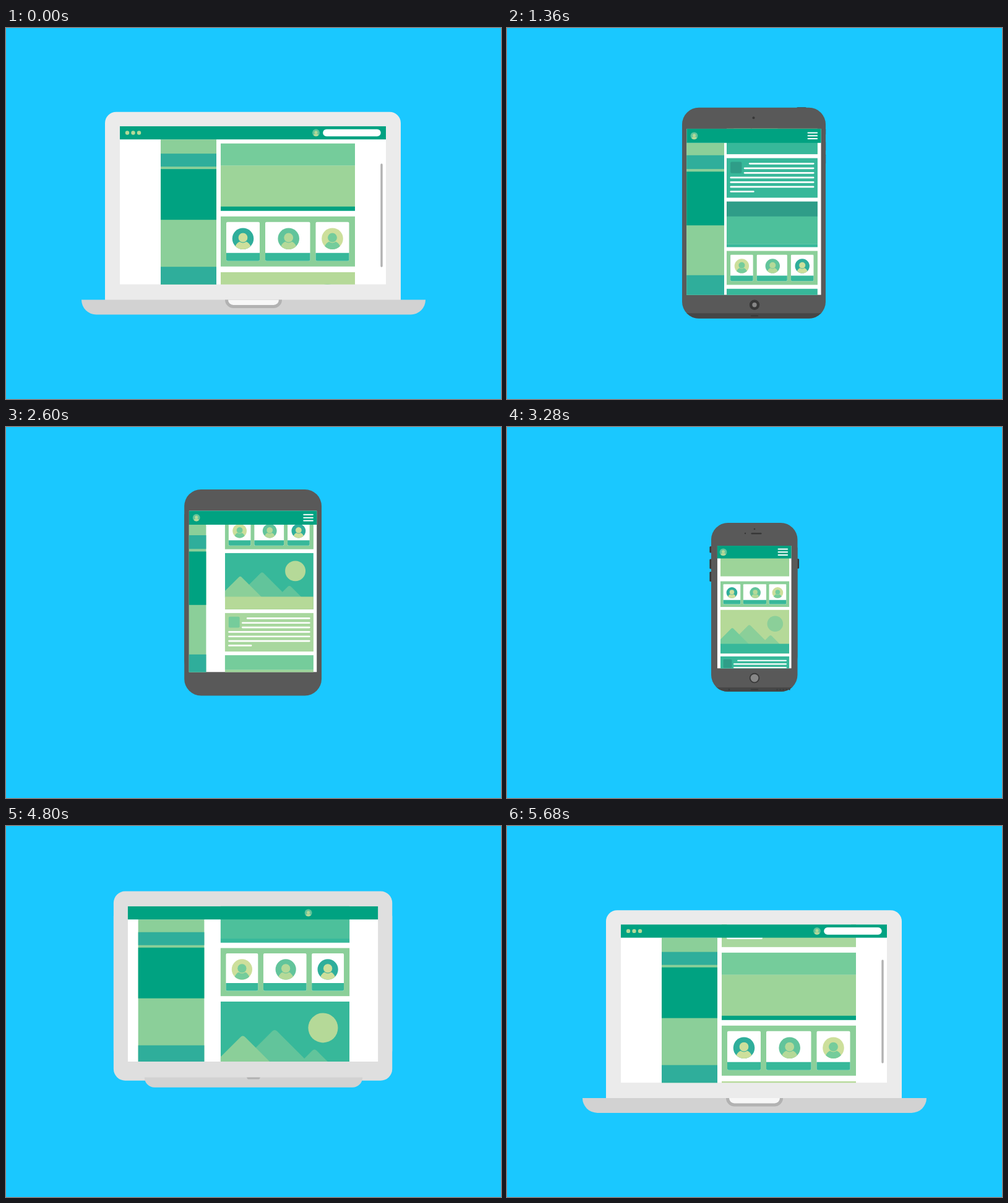
An HTML page that plays this animation: 800 by 600 pixels, repeating every 5720 ms.

```html
<!DOCTYPE html>
<html lang="en">
<head>
<meta charset="utf-8">
<title>Responsive devices</title>
<style>
  html, body { margin: 0; width: 100%; height: 100%; overflow: hidden; background: #1ac8ff; }
  body > svg { display: block; width: 100vw; height: 100vh; }
</style>
</head>
<body>
<svg viewBox="0 0 800 600">
  <defs><clipPath id="disc"><circle r="1"/></clipPath></defs>
  <g id="scene"></g>
</svg>
<script>
const LOOP = 5720, GAP = 9, PAGE = 918, COLUMN = 217;
const C = {
  dark: '#00a281', teal: '#2fae9b', sea: '#37b89a', deep: '#2f9d88', mint: '#4dc09b', mid: '#62c49b',
  leaf: '#75cc9b', green: '#8bcf99', grass: '#9dd499', lime: '#a8d79e', sand: '#b5d998', yellow: '#cddf9b',
  white: '#fff', ink: '#383838', steel: '#b2b2b2'
};
const scene = document.getElementById('scene');

// Body, screen insets, page columns and scrolling of each device.
const laptop = {
  cx: 399, w: 478, h: 309, r: 18, grey: 235, rest: 290.5, hover: 258,
  inset: 24, top: 23, bottom: 30, bar: 21.5, avatar: 501,
  main: 347, mainEnd: 564, side: 250, sideEnd: 340, sideTop: 23, sideScale: 1, foot: 1, start: -7, speed: .4405
};
const tablet = {
  cx: 399, w: 232, h: 341, r: 27, grey: 89, rest: 301.5, hover: 268,
  inset: 7.25, top: 34, bottom: 38, bar: 23, avatar: 302.5,
  main: 355, mainEnd: 502, side: 290, sideEnd: 351, sideTop: 20, sideScale: 1.06, foot: 1, start: 3.8, speed: .156
};
const phone = {
  cx: 399.75, w: 139.5, h: 273, r: 27, grey: 89, rest: 300.5, hover: 265.5,
  inset: 9.75, top: 37, bottom: 37.5, bar: 20.5, avatar: 349.5,
  main: 345, mainEnd: 456, side: -195, sideEnd: 100, sideTop: -7, sideScale: 1, foot: 0, start: -589.8, speed: .33
};
const hops = [
  { from: laptop, to: tablet, leave: 270, land: 1120 },
  { from: tablet, to: phone, leave: 2210, land: 3080 },
  { from: phone, to: laptop, leave: 4155, land: 5050 }
];

const n = x => +x.toFixed(3);
const mix = (a, b, p) => a + (b - a) * p;
const clamp = x => Math.min(1, Math.max(0, x));
const cubic = x => x < .5 ? 4 * x ** 3 : 1 - 4 * (1 - x) ** 3;
const ease = (t, start, length) => (1 - Math.cos(Math.PI * clamp((t - start) / length))) / 2;
// 1 while on, also when the span runs across the loop's end.
const between = (t, on, off, length) => (on > off ? 1 : 0) + ease(t, on, length) - ease(t, off, length);
const parts = (t, delay) => between(t, 1230 + delay, 2230, 130) + between(t, 3030 + delay, 4140, 130);
const blend = (a, b, p) => Object.fromEntries(Object.keys(a).map(k => [k, mix(a[k], b[k], p)]));

const rect = (x, y, w, h, fill, r = 0, extra = '') => w > 0 && h > 0
  ? `<rect x="${n(x)}" y="${n(y)}" width="${n(w)}" height="${n(h)}" rx="${n(r)}" fill="${fill}" ${extra}/>` : '';
const circle = (x, y, r, fill) => r > 0 ? `<circle cx="${n(x)}" cy="${n(y)}" r="${n(r)}" fill="${fill}"/>` : '';
const pill = (cx, cy, w, h, fill) => rect(cx - w / 2, cy - h / 2, w, h, fill, h / 2);
const group = (transform, body) => `<g transform="${transform}">${body}</g>`;
function cup(x, y, w, h, fill, radius = h) {
  if (w <= 0 || h <= 0) return '';
  const r = n(Math.min(radius, h, w / 2));
  return `<path fill="${fill}" d="M${n(x)} ${n(y)}h${n(w)}v${n(h - r)}a${r} ${r} 0 0 1 ${-r} ${r}h${n(2 * r - w)}a${r} ${r} 0 0 1 ${-r} ${-r}z"/>`;
}

const person = (x, y, r, [back, front]) => group(`translate(${n(x)} ${n(y)}) scale(${n(r)})`,
  circle(0, 0, 1, back) +
  `<g clip-path="url(#disc)">${circle(0, .95, .75, front)}<circle cy="-.1" r=".46" fill="${front}" stroke="${back}" stroke-width=".06"/></g>`);

const banner = (head, body, foot, alpha) =>
  rect(0, 0, COLUMN, 36, head) + rect(0, 35.8, COLUMN, 66.4, body) +
  rect(0, 102, COLUMN, 7, foot, 0, `opacity="${n(alpha)}"`);

function team(faces) {
  const tile = (x, w, face, colors) =>
    rect(x, 9, w, 63, C.white, 2) + cup(x, 59, w, 13, C.sea, 2.5) + person(face, 36, 17.3, colors);
  return rect(0, 0, COLUMN, 81, C.green) +
    tile(9, 54, 36, faces[0]) + tile(72, 72.5, 109.7, faces[1]) + tile(153.5, 54, 180.5, faces[2]);
}

const peak = (x, y, fill) =>
  `<path fill="${fill}" d="M${x - 110 + y} 110L${x - 4} ${y + 4}q4 -4 8 0L${x + 110 - y} 110z"/>`;
const landscape = (sky, sun, back, front, ground) =>
  `<svg width="${COLUMN}" height="138.5">` + rect(0, 0, COLUMN, 138.5, sky) + circle(172.5, 44.4, 25, sun) +
  peak(91, 46, back) + peak(158, 79, back) + peak(37.4, 56, front) + rect(0, 107.5, COLUMN, 31, ground) + '</svg>';

function article(back, square) {
  let s = rect(0, 0, COLUMN, 94.5, back) + rect(9, 9, 27, 27, square, 3);
  for (let i = 0; i < 7; i++) {
    const x = i < 1 ? 53 : i < 3 ? 41 : 8, end = i < 6 ? 209 : 66;
    s += rect(x, 11 + i * 11.13, end - x, 4, C.white, 2);
  }
  return s;
}

const faces = [[C.teal, C.yellow], [C.mid, C.sand], [C.yellow, C.leaf]];
const cards = alpha => [
  [109, banner(C.leaf, C.grass, C.dark, alpha)],
  [81, team(faces)],
  [138.5, landscape(C.sand, C.green, C.green, C.leaf, C.sea)],
  [94.5, article(C.sea, C.deep)],
  [109, banner(C.deep, C.mint, C.sea, 1)],
  [81, team([...faces].reverse())],
  [138.5, landscape(C.sea, C.sand, C.mid, C.green, C.sand)],
  [94.5, article(C.lime, C.leaf)]
];

function feed(d, top, screenHeight, scroll) {
  const scale = (d.mainEnd - d.main) / COLUMN, visible = screenHeight / scale;
  const stack = cards(d.foot);
  let y = -(((scroll / scale) % PAGE + PAGE) % PAGE), s = '';
  for (let i = 0; y < visible; i++) {
    const [height, body] = stack[i % stack.length];
    if (y + height > 0) s += group(`translate(${n(d.main)} ${n(top + y * scale)}) scale(${n(scale)})`, body);
    y += height + GAP;
  }
  return s;
}

function sidebar(d, top, height) {
  const block = (from, h, fill) =>
    rect(d.side, top + d.sideTop + from * d.sideScale, d.sideEnd - d.side, h * d.sideScale, fill);
  return rect(d.side, top, d.sideEnd - d.side, height, C.green) +
    block(0, 21, C.teal) + block(25, 82, C.dark) + block(183, 120, C.teal);
}

function sideButtons(d, x, y, out, isPhone) {
  if (out <= 0) return '';
  const reach = out * 2.6, right = x + d.w + reach - 6, left = x - reach;
  const first = isPhone ? 38 : 34;
  let s = isPhone ? rect(right, y + 58, 6, 16, C.ink, 1.5) : rect(x + 185, y - reach - .4, 16, 6, C.ink, 1.5);
  for (let i = 0; i < 3; i++) {
    s += rect(isPhone ? left : right, y + first + i * 20.5, 6, i ? 16 : 10.5, C.ink, 1.5);
  }
  return s;
}

function hardware(t, d, x, y, isPhone) {
  const shown = parts(t, 0), lit = parts(t, 60), out = parts(t, 110);
  if (shown <= 0) return '';
  const bottom = y + d.h, strip = d.h * .025, hole = bottom - strip / 2;
  let s = `<clipPath id="shell">${rect(x, y, d.w, d.h, '#000', d.r)}</clipPath>` +
    rect(x, bottom - strip, d.w, strip, '#464646', 0, `clip-path="url(#shell)" opacity="${n(shown)}"`);
  s += pill(400, hole, 12 * shown, 2, C.ink) + circle(x + 29, hole, 1.3 * out, C.ink);
  for (let i = 0; i < 5; i++) s += circle(x + d.w * .75 + 2 + i * 5, hole, 1.1 * out, C.ink);
  s += isPhone
    ? circle(400, y + 10, 1.3 * shown, C.ink) + circle(385, y + 17, 1.2 * shown, C.ink) + pill(403, y + 17.2, 17 * shown, 2.5, C.ink)
    : circle(398.5, y + 16.5, 2 * shown, C.ink);
  return s + circle(400, bottom - 22, 8.2 * shown, C.ink) + circle(400, bottom - 22, 6.4 * lit, '#878787');
}

function base(t, y) {
  const w = 556 * between(t, 4590, 362, 360), h = 24 * between(t, 4702, 571, 160);
  const notch = between(t, 4750, 557, 160), nw = 92 * notch, nh = 13.5 * notch, rim = 5 * notch;
  return cup(400 - w / 2, y, w, h, '#d2d2d2') + cup(400 - nw / 2, y, nw, nh, C.steel) +
    (notch > .4 ? cup(400 - nw / 2 + rim, y, nw - 2 * rim, nh - rim, '#f7f7f7') : '');
}

function browserBar(t, right, mid) {
  let s = '';
  for (let i = 0; i < 3; i++) {
    s += circle(196 + i * 9.5, mid, 3.2 * between(t, 5080 + i * 40, 480 + i * 20, 120), C.sand);
  }
  const w = 93.5 * between(t, 5080, 360, 200);
  return s + rect(right - 8.3 - w, mid - 5.8, w, 11.6, C.white, 5.8);
}

function menu(t, cx, mid) {
  const w = 16.6 * between(t, 1160, 4200, 160);
  let s = '';
  for (let i = -1; i < 2; i++) s += pill(cx, mid + i * 4.8, w, 2, C.white);
  return s;
}

function scrollbar(t, top) {
  const shown = between(t, 5240, 620, 120);
  const since = t < LOOP / 2 ? t : t - LOOP, u = clamp(since / 600);
  const offset = since < 0 ? Math.max(2, 39 + since * .0875) : 39 + 26 * u * (2 - u);
  return rect(605.3, top + offset, 3.4, 167.5, C.steel, 1.7, `opacity="${n(shown)}"`);
}

// Rise, hover, fall past the resting height and bounce out.
function centre(t, { from, to, leave, land }, hover) {
  if (t < land) return mix(from.rest, hover, ease(t, leave, 280));
  const past = .16, fall = 340, swings = (t - land - fall) / 120;
  const lift = swings < 0
    ? mix(1, -past, ease(t, land, fall))
    : -past * Math.exp(-.9 * swings) * Math.cos(Math.PI * swings);
  return mix(to.rest, hover, lift);
}

function render(t) {
  const hop = [...hops].reverse().find(h => h.leave <= t) || hops[2];
  const { from, to } = hop;
  const clock = t < hop.leave ? t + LOOP : t;
  const p = cubic(clamp((clock - hop.leave - 210) / 600));
  const d = blend(from, to, p);
  const arrival = to === laptop ? to.start + 2 * PAGE + to.speed * (clock - LOOP) : to.start + to.speed * clock;
  const scroll = mix(from.start + from.speed * clock, arrival, p);
  const isPhone = (p < .5 ? from : to) === phone;

  const x = d.cx - d.w / 2, y = centre(clock, hop, d.hover) - d.h / 2;
  const sx = x + d.inset, sy = y + d.top, sw = d.w - 2 * d.inset, sh = d.h - d.top - d.bottom;
  const top = sy + d.bar, mid = sy + d.bar / 2;
  const lid = `rgb(${[0, 0, 0].fill(Math.round(d.grey))})`;
  const corner = d.r * (1 - between(t, 5100, 300, 150));

  scene.innerHTML =
    sideButtons(d, x, y, parts(t, 110), isPhone) +
    rect(x, y, d.w, d.h - 30, lid, d.r) + cup(x, y + 40, d.w, d.h - 40, lid, corner) +
    hardware(t, d, x, y, isPhone) +
    `<svg x="${n(sx)}" y="${n(sy)}" width="${n(sw)}" height="${n(sh)}" viewBox="${n(sx)} ${n(sy)} ${n(sw)} ${n(sh)}">` +
    rect(sx, sy, sw, sh, C.white) + feed(d, top, sh, scroll) + sidebar(d, top, sh) + scrollbar(t, top) +
    rect(sx, sy, sw, d.bar, C.dark) + person(d.avatar, mid, 5.9, [C.mid, C.sand]) +
    browserBar(t, sx + sw, mid) + menu(t, sx + sw - 13.9, mid) +
    '</svg>' + base(t, y + d.h - 5.2);
}

const begin = performance.now();
function tick() {
  render((performance.now() - begin) % LOOP);
  requestAnimationFrame(tick);
}
tick();
</script>
</body>
</html>
```
